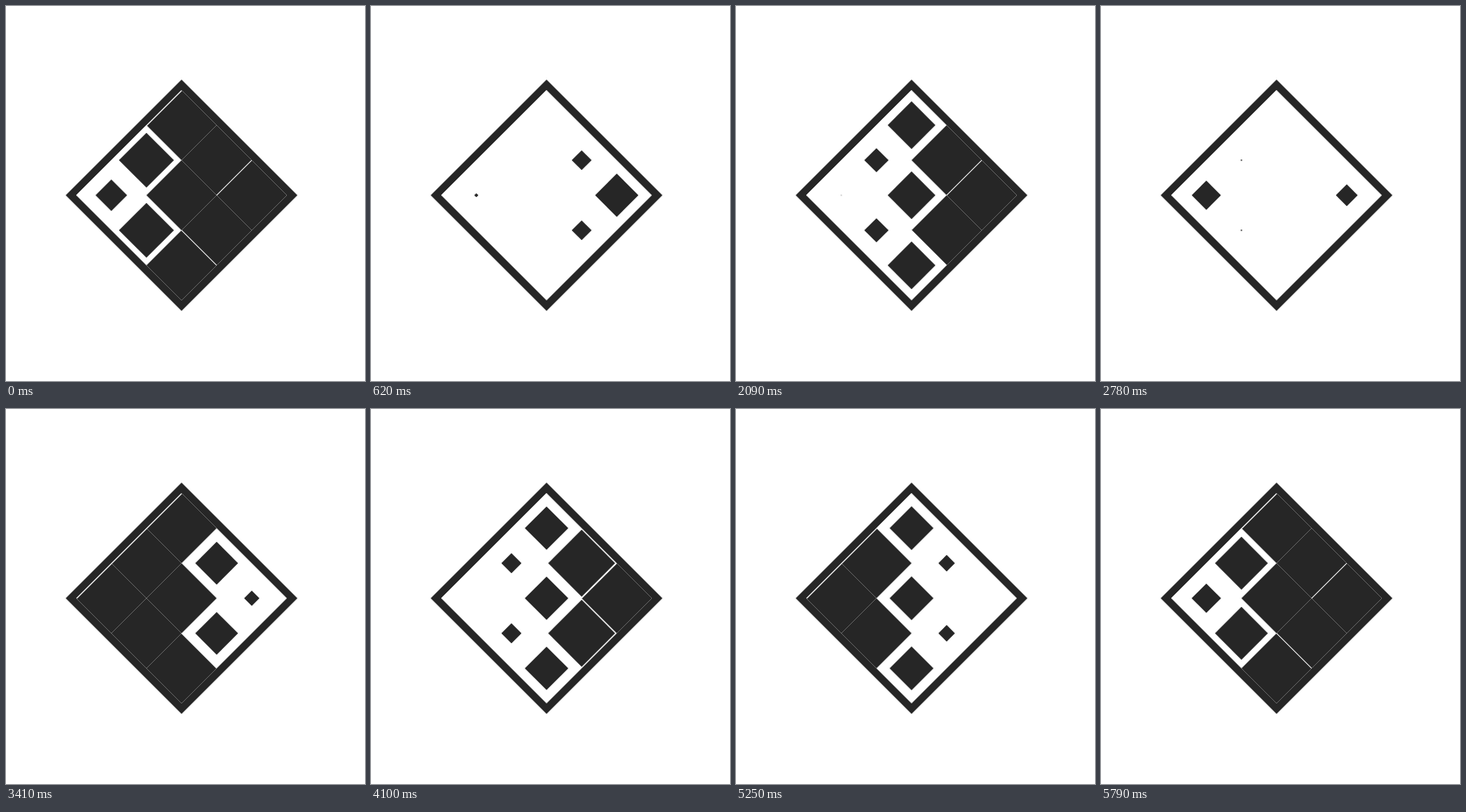
Animation, 409 px wide and 428 px high, one loop 5870 ms. Source, as an HTML page without scripts:

```html
<!DOCTYPE html>
<html lang="en">
<head>
<meta charset="utf-8">
<title>Diamond grid loader</title>
<style>
  @property --t {
    syntax: "<number>";
    inherits: true;
    initial-value: 1.65;
  }

  html, body {
    margin: 0;
    width: 100%;
    height: 100%;
    overflow: hidden;
    background: #fff;
  }

  svg {
    display: block;
    width: 409px;
    height: 428px;
    fill: #262626;
    animation: clock 5870ms infinite;
  }

  /* One clock, counted in column delays; a full wave takes 10. */
  @keyframes clock {
    0%     { --t: 1.65;  animation-timing-function: step-end; }
    1.19%  { --t: 3.25;  animation-timing-function: step-end; }
    4.25%  { --t: 3.6;   animation-timing-function: steps(8); }
    14.47% { --t: 6.7;   animation-timing-function: steps(5); }
    20.95% { --t: 8.64;  animation-timing-function: steps(11); }
    35.6%  { --t: 12.96; animation-timing-function: steps(17); }
    58.09% { --t: 19.56; animation-timing-function: steps(9); }
    69.84% { --t: 23.14; animation-timing-function: steps(9); }
    81.77% { --t: 26.64; animation-timing-function: steps(13); }
    98.63% { --t: 31.74; animation-timing-function: step-end; }
    100%   { --t: 31.74; }
  }

  /* Each wave: shrink over 3, stay empty for 2, grow over 2.56. */
  .cell {
    --q: calc(var(--t) - 2 - var(--c) + var(--r));
    --w0: max(1 - var(--q) / 3, (var(--q) - 5) / 2.56);
    --w1: max(1 - (var(--q) - 10) / 3, (var(--q) - 15) / 2.56);
    --w2: max(1 - (var(--q) - 20) / 3, (var(--q) - 25) / 2.56);
    --w3: max(1 - (var(--q) - 30) / 3, (var(--q) - 35) / 2.56);
    --s: max(0, min(1, var(--w0), var(--w1), var(--w2), var(--w3)));
    transform:
      translate(calc(var(--c) * 56.569px), calc(var(--r) * 56.569px))
      scale(var(--s));
  }

  .left  { --c: -1; }
  .mid   { --c: 0; }
  .right { --c: 1; }
  .top   { --r: -1; }
  .row   { --r: 0; }
  .low   { --r: 1; }
</style>
</head>
<body>
<svg viewBox="0 0 409 428">
  <defs>
    <rect id="tile" x="-28.284" y="-28.284" width="56.569" height="56.569"/>
  </defs>
  <path fill-rule="evenodd" d="M200 84l132 132-132 132-132-132zM200 96l120 120-120 120-120-120z"/>
  <g transform="translate(200 216) rotate(45)">
    <g class="cell left top"><use href="#tile"/></g>
    <g class="cell mid top"><use href="#tile"/></g>
    <g class="cell right top"><use href="#tile"/></g>
    <g class="cell left row"><use href="#tile"/></g>
    <g class="cell mid row"><use href="#tile"/></g>
    <g class="cell right row"><use href="#tile"/></g>
    <g class="cell left low"><use href="#tile"/></g>
    <g class="cell mid low"><use href="#tile"/></g>
    <g class="cell right low"><use href="#tile"/></g>
    <!-- open seams -->
    <path fill="none" stroke="#fff" d="M-84.4 -84.5V84.5M28.284 -84.5V-28.3M28.3 28.284H84.5"/>
  </g>
</svg>
</body>
</html>
```
